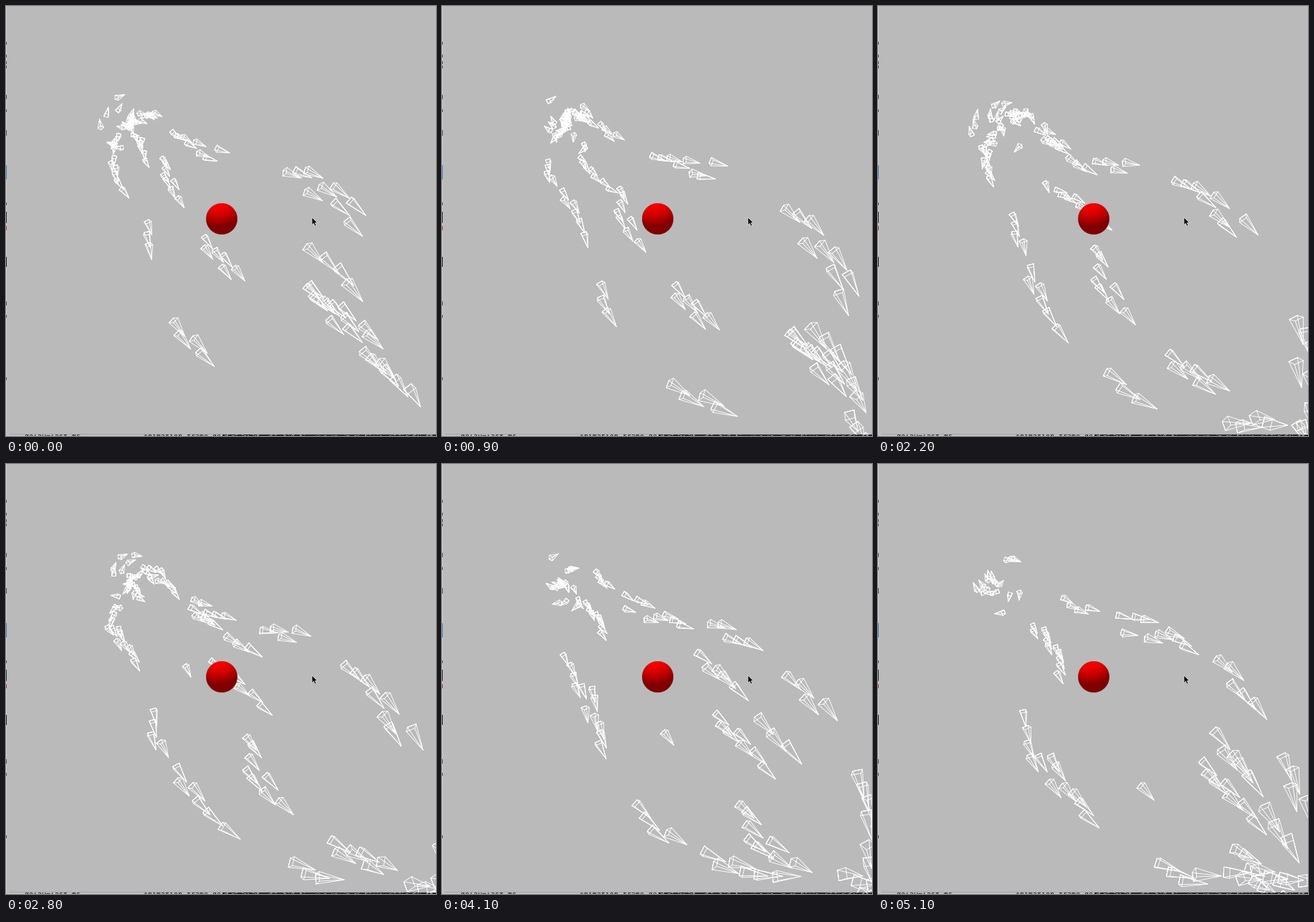
A matplotlib script for the animation above (5200 ms loop, 600 px wide and 600 px high).

```python
import numpy as np
import matplotlib.pyplot as plt
from matplotlib.animation import FuncAnimation
from matplotlib.collections import LineCollection
from matplotlib.patches import Polygon, Rectangle

SIZE, DPI, FRAMES, STEP = 600, 100, 52, 100
PX = 72 / DPI
GREY = "#bababa"
NEST = 171 + 167j
EDGES = [0, 1, 2, 3, 0, 4, 1, 2, 4, 3]
rng = np.random.default_rng(11)


class Lane:
    """Stream leaving the nest; keys are (age, x, y), bunches are (age at start, count)."""

    def __init__(self, keys, bunches, size):
        t, x, y = np.array(keys, float).T
        self.t, self.z = t, x + 1j * y
        self.slope = np.gradient(self.z, t)
        self.size = size
        self.age = np.concatenate([a + 0.55 * n * np.linspace(-1, 1, n) for a, n in bunches])
        total = len(self.age)
        width = np.concatenate([np.full(n, min(14, 3 + 1.5 * n)) for _, n in bunches])
        self.side = width * rng.uniform(-1, 1, total)
        self.roll = rng.uniform(0.2, 1.2, total)
        self.wobble = rng.normal(0, 0.9, total)

    def curve(self, age):
        i = np.clip(np.searchsorted(self.t, age) - 1, 0, len(self.t) - 2)
        h = self.t[i + 1] - self.t[i]
        s = (age - self.t[i]) / h
        return ((1 + 2 * s) * (1 - s) ** 2 * self.z[i]
                + s * (1 - s) ** 2 * h * self.slope[i]
                + s * s * (3 - 2 * s) * self.z[i + 1]
                + s * s * (s - 1) * h * self.slope[i + 1])

    def boids(self, t):
        age = self.age + t
        live = (age > 0) & (age < self.t[-1])
        age = age[live]
        way = np.angle(self.curve(age + 0.5) - self.curve(age - 0.5))
        grow = np.clip(age / 35, 0.3, 1.2)
        p = self.curve(age) + 1j * np.exp(1j * way) * self.side[live] * grow
        way = way + self.wobble[live] * np.exp(-np.abs(p - NEST) / 45)
        return [pyramid(*b, self.size) for b in zip(p, way, self.roll[live])]


def pyramid(p, way, roll, size=1.0):
    """Outline of a wire pyramid pointing along its way, leaning to the viewer."""
    d = abs(p - NEST)
    near = np.clip((p.imag - 500) / 70, 0, 1) * np.clip((p.real - 470) / 60, 0, 1)
    pitch = 0.35 + 0.6 * np.exp(-d / 110) + 0.5 * near
    length = (15 + 0.05 * d) * size
    corner = 0.25 * length * np.exp(1j * (roll + np.pi / 2 * np.arange(4)))
    base = -length / 2 * np.cos(pitch) + corner.real * np.sin(pitch) + 1j * corner.imag
    pts = p + np.append(base, length / 2 * np.cos(pitch)) * np.exp(1j * way)
    pts = pts[EDGES]
    return np.column_stack([pts.real, pts.imag])


LANES = [
    Lane([(0, 171, 160), (14, 214, 155), (22, 245, 185), (34, 342, 223), (39, 390, 233),
          (47, 468, 275), (59, 573, 411), (66, 601, 515), (76, 625, 690)],
         [(-24, 4), (-12, 9), (0, 5), (11, 4), (25, 8), (45, 9)], 1.0),
    Lane([(0, 171, 167), (17, 200, 158), (22, 238, 190), (30, 284, 224),
          (42, 389, 300), (49, 471, 386), (59, 564, 518), (68, 625, 650)],
         [(0, 3), (2, 2), (8, 3), (48, 4)], 1.1),
    Lane([(0, 171, 167), (8, 185, 190), (17, 204, 228), (22, 229, 250), (30, 270, 269),
          (42, 357, 334), (59, 479, 449), (70, 563, 541), (78, 620, 650)],
         [(8, 5), (14, 2), (54, 3), (55, 5), (62, 8), (69, 3)], 0.9),
    Lane([(0, 171, 167), (12, 205, 205), (20, 228, 238), (34, 275, 323), (42, 318, 383),
          (54, 391, 473), (61, 446, 522), (71, 541, 578), (82, 660, 640)],
         [(-27, 11), (1.5, 1), (20, 7), (27, 1), (38.5, 6)], 0.9),
    Lane([(0, 171, 167), (10, 152, 192), (18, 149, 229), (32, 197, 318), (40, 218, 398),
          (52, 312, 515), (59, 408, 567), (69, 530, 578), (80, 670, 590)],
         [(-14, 2), (-10, 2), (-5, 8), (10, 4), (18, 4), (23, 2), (33, 3), (47, 4)], 1.0),
]

# Newborn boids drift outwards from the nest, then start again.
BROOD, LIFE = 18, 30
brood_way = rng.uniform(0, 2 * np.pi, (BROOD, 3))
brood_age = rng.integers(0, LIFE, BROOD)


def newborn(t):
    out = []
    for i in range(BROOD):
        cycle, age = divmod(t + brood_age[i], LIFE)
        way = brood_way[i, cycle]
        out.append(pyramid(NEST + (2 + 1.4 * age) * np.exp(1j * way), way + age / 20, i))
    return out


def box(x, y, w, h, color, z):
    ax.add_patch(Rectangle((x, y), w, h, fc=color, ec="none", zorder=z, antialiased=False))


def draw_sphere(x, y, r, n=176):
    u = np.linspace(-1, 1, n)
    gx, gy = np.meshgrid(u, u)
    rr = gx ** 2 + gy ** 2
    gz = np.sqrt(np.clip(1 - rr, 0, 1))
    light = np.clip(-0.15 * gx - 0.85 * gy + 0.45 * gz, 0, 1)
    img = np.zeros((n, n, 4))
    img[..., 0] = 0.5 + 0.48 * light
    img[..., 3] = rr <= 1
    ax.imshow(img, extent=(x - r, x + r, y + r, y - r), zorder=6,
              interpolation="antialiased", aspect="auto")


def draw_desktop():
    """Slivers of the windows behind the stage."""
    box(0, 597, SIZE, 3, "#c2c2c2", 0)
    for x, words in ((14, "--delay=last_ms"), (192, "Animation frame delay")):
        ax.text(x, 603.5, words, family="DejaVu Sans Mono", size=10 * PX,
                color="#222222", va="baseline", zorder=1)
    box(302, 597, 298, 3, "#2b2b2b", 2)
    for x in rng.uniform(303, 598, 75):
        box(round(x), 598 + rng.integers(2), rng.integers(1, 4), 1, "#8a8a8a", 3)
    box(0, 0, SIZE, 597, GREY, 4)
    box(4, 597, SIZE - 4, 1, "#a2a2a2", 4)
    box(0, 0, 1, 597, "#d0d0d0", 5)
    for y in rng.uniform(30, 590, 17):
        box(0, round(y), 1, 4, "#555555", 5)
    for y, h, color in ((222, 20, "#3f86c0"), (287, 15, "#333333"),
                        (307, 6, "#b04040"), (350, 14, "#222222")):
        box(0, y, 1, h, color, 5)


def draw_cursor(x, y):
    shape = [(0, 0), (0, 10.5), (2.4, 8.3), (4, 12), (5.8, 11.2), (4.2, 7.6), (7.2, 7.4)]
    ax.add_patch(Polygon([(x + a, y + b) for a, b in shape], fc="black",
                         ec="#e8e8e8", lw=0.6 * PX, zorder=8))


fig = plt.figure(figsize=(SIZE / DPI, SIZE / DPI), dpi=DPI, facecolor=GREY)
ax = fig.add_axes([0, 0, 1, 1])
draw_desktop()
draw_sphere(300.7, 297, 21.7)
draw_cursor(427, 295)
ax.set(xlim=(0, SIZE), ylim=(SIZE, 0))
ax.axis("off")

wires = LineCollection([], colors="white", linewidths=0.9 * PX, zorder=5.5)
ax.add_collection(wires, autolim=False)
wires.set_clip_path(Rectangle((0, 0), SIZE, 598, transform=ax.transData))


def update(t):
    lines = newborn(t)
    for lane in LANES:
        lines += lane.boids(t)
    wires.set_segments(lines)
    return [wires]


anim = FuncAnimation(fig, update, frames=FRAMES, interval=STEP, repeat=True, repeat_delay=0)
plt.show()
```
